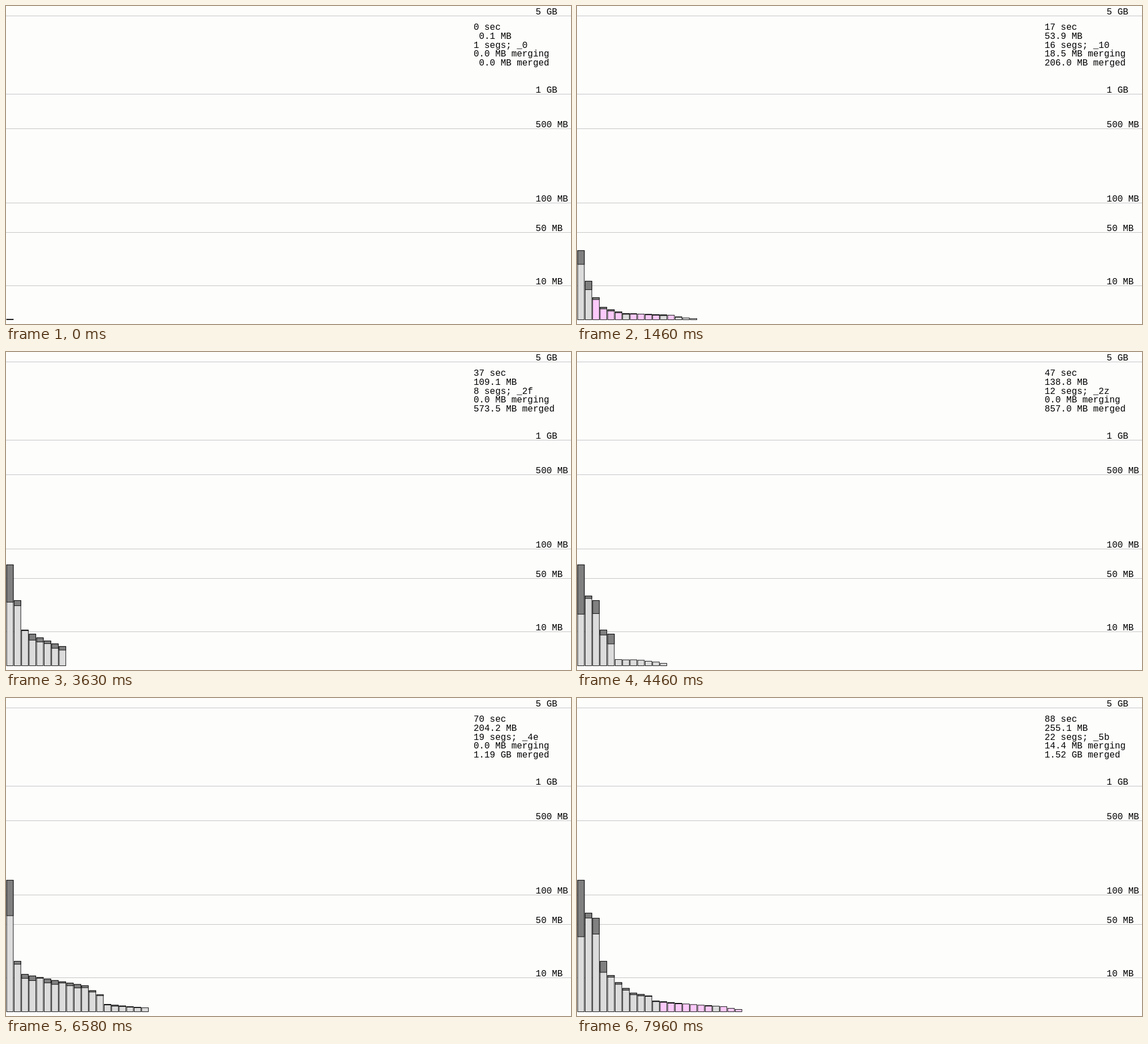
These frames come from a looping animation (998 by 561 pixels, 8 s). An HTML page with a canvas:

```html
<!DOCTYPE html>
<html lang="en">
<head>
<meta charset="utf-8">
<title>Segment merging</title>
<style>
  html, body { margin: 0; width: 100%; height: 100%; overflow: hidden; background: #fdfdfc; }
  canvas { display: block; }
</style>
</head>
<body>
<canvas id="stage" width="998" height="561"></canvas>
<script>
const ctx = document.getElementById('stage').getContext('2d');
const LOOP = 8000, STEPS_PER_CS = 0.24;
const SCALE = 998 / 1280, BASE = 553.4, UNIT = 85.8;
const LIVE = '#dcdcdc', DELETED = '#808080', MERGING = '#fccafa';
const GRID_MB = [10, 50, 100, 500, 1024, 5120];

// Key moments of the index. curve: [bar, height] points, eased between;
// worn: deleted share of the first bars, fade: of the rest; pink: range being merged, except spare;
// keep: [bar here, bar at the next moment]; rate: deleted share per step.
const STATES = [
  { n: 0, id: 0, sec: 0, mb: 0.1, merging: 0, merged: 0,
    curve: [[0, 1]], worn: [0], keep: [] },
  { n: 35, id: 36, sec: 17, mb: 53.9, merging: 18.5, merged: 206, rate: 0.0125,
    curve: [[0, 122], [1, 68], [2, 39], [3, 22], [6, 11], [12, 8], [15, 2]],
    worn: [0.2, 0.22], fade: 0.09, pink: [2, 12], spare: [6, 11], keep: [[0, 0]] },
  { n: 62, id: 62, sec: 24, mb: 72.4, merging: 94.7, merged: 485.4, rate: 0.01,
    curve: [[0, 122], [1, 91], [2, 94], [3, 83], [4, 26], [7, 8], [12, 4]],
    worn: [0.45, 0.07, 0.2, 0.25], fade: 0.05, pink: [0, 9], keep: [] },
  { n: 87, id: 87, sec: 37, mb: 109.1, merging: 0, merged: 573.5, rate: 0.015,
    curve: [[0, 178], [1, 115], [2, 63], [7, 34]],
    worn: [0.37, 0.08, 0.02, 0.19], fade: 0.13, keep: [] },
  { n: 126, id: 126, sec: 57, mb: 167.1, merging: 0, merged: 1126.4, rate: 0.006,
    curve: [[0, 232], [1, 54], [2, 52], [3, 31], [9, 13], [16, 4]],
    worn: [0.085, 0.05, 0.02], fade: 0.08, keep: [[0, 0]] },
  { n: 158, id: 158, sec: 70, mb: 204.2, merging: 0, merged: 1218.6, rate: 0.007,
    curve: [[0, 232], [1, 89], [2, 66], [10, 46], [12, 30], [13, 13], [18, 7]],
    worn: [0.27, 0.06, 0.11, 0.13, 0.02], fade: 0.1, keep: [[0, 0], [1, 3]] },
  { n: 191, id: 191, sec: 88, mb: 255.1, merging: 14.4, merged: 1556.5, rate: 0.005,
    curve: [[0, 232], [1, 174], [2, 165], [3, 89], [4, 64], [7, 33], [9, 28], [10, 19], [19, 9], [21, 4]],
    worn: [0.43, 0.05, 0.17, 0.22, 0.05], fade: 0.06, pink: [11, 21], spare: [18], keep: [] }
];

const lerp = (a, b, u) => a + (b - a) * u;
const toMB = h => 10 * (Math.exp(h / UNIT) - 1);
const toHeight = mb => UNIT * Math.log(1 + mb / 10);
const liveMB = s => toMB(s.h) * (1 - s.del / s.h);
const rand = n => { const v = Math.sin(n * 12.9898 + 4.1) * 43758.5453; return v - Math.floor(v); };

function curveAt(points, i) {
  const k = points.findIndex(p => p[0] >= i);
  const [x, h] = points[k];
  if (x === i) return h;
  const [x0, h0] = points[k - 1];
  return h0 * Math.pow(h / h0, (i - x0) / (x - x0));
}

function stateBars(s) {
  const count = s.curve[s.curve.length - 1][0] + 1;
  const [first, last] = s.pink || [0, -1];
  return Array.from({ length: count }, (_, i) => {
    const h = curveAt(s.curve, i);
    const share = s.worn[i] ?? s.fade * lerp(0.4, 1.6, rand(s.n + i));
    const pink = i >= first && i <= last && !(s.spare || []).includes(i);
    return { h, del: h * share, pink };
  });
}

function barsBetween(a, b, n) {
  const span = b.n - a.n, u = (n - a.n) / span;
  const merges = [0.35, 0.65, 1].map(f => a.n + Math.round(span * f));
  const from = stateBars(a), to = stateBars(b);
  const segs = [], births = new Set();

  from.forEach((s, i) => {
    const pair = a.keep.find(p => p[0] === i);
    if (pair) {
      segs.push({ h: s.h, del: lerp(s.del, to[pair[1]].del, u), birth: 0, death: Infinity });
      return;
    }
    const death = s.pink ? a.n + 4 : merges[i >= from.length / 2 ? 0 : 1];
    const del = Math.min(s.h * 0.7, s.del + s.h * b.rate * (n - a.n));
    segs.push({ h: s.h, del, birth: 0, death });
  });

  to.forEach((s, j) => {
    if (a.keep.some(p => p[1] === j)) return;
    const wanted = Math.max(s.del / s.h / b.rate, Math.min(to.length - 1 - j, 6));
    const age = Math.min(span - 4, Math.round(wanted));
    const birth = b.n - age;
    births.add(birth);
    segs.push({ h: s.h, del: age ? s.del * (n - birth) / age : 0, birth, death: Infinity });
  });

  // Fresh flushes live until the next merge.
  for (let f = a.n + 1; f < b.n; f++) {
    if (births.has(f)) continue;
    const h = 4 + 10 * rand(f);
    segs.push({ h, del: Math.min(2, h * b.rate * Math.max(0, n - f)), birth: f, death: merges.find(m => m > f) });
  }
  const mergedMB = segs.filter(s => s.death === merges[0]).reduce((sum, s) => sum + liveMB(s), 0);
  const h = toHeight(mergedMB);
  segs.push({ h, del: Math.max(0, h * b.rate * (n - merges[0])), birth: merges[0], death: merges[1] });

  return segs
    .filter(s => s.birth <= n && n < s.death)
    .map(s => ({ h: s.h, del: s.del, pink: s.death - n <= 4 }))
    .sort((p, q) => liveMB(q) - liveMB(p));
}

function snapshot(n) {
  const i = STATES.findLastIndex(s => s.n <= n);
  const a = STATES[i], b = STATES[i + 1];
  if (a.n === n) return { ...a, bars: stateBars(a) };
  const u = (n - a.n) / (b.n - a.n);
  const held = Math.floor((n - a.n) / 4) * 4 / (b.n - a.n);
  const bars = barsBetween(a, b, n);
  return {
    bars,
    id: Math.round(lerp(a.id, b.id, u)),
    sec: lerp(a.sec, b.sec, u),
    mb: lerp(a.mb, b.mb, u),
    merging: bars.reduce((sum, s) => sum + (s.pink ? toMB(s.h) : 0), 0),
    merged: lerp(a.merged, b.merged, held)
  };
}

function formatSize(mb, width) {
  return mb >= 1024 ? (mb / 1024).toFixed(2) + ' GB' : mb.toFixed(1).padStart(width) + ' MB';
}

function box(x, y, h, fill) {
  ctx.fillStyle = fill;
  ctx.fillRect(x, y, 15 * SCALE, h);
  ctx.strokeRect(x, y, 15 * SCALE, h);
}

function drawBar(s, i) {
  const x = (1.5 + 17 * i) * SCALE, top = BASE - s.h;
  box(x, top, s.h, s.pink ? MERGING : LIVE);
  if (s.del > 0.6) box(x, top, s.del, DELETED);
}

function drawGrid() {
  for (const mb of GRID_MB) {
    const y = Math.floor(BASE - toHeight(mb));
    ctx.fillStyle = '#c6c6c6';
    ctx.fillRect(0, y, 998, 1);
    ctx.fillStyle = '#000';
    ctx.fillText(mb < 1024 ? mb + ' MB' : mb / 1024 + ' GB', 935.6, y - 1.7);
  }
}

function draw(n) {
  const s = snapshot(n);
  ctx.fillStyle = '#fdfdfc';
  ctx.fillRect(0, 0, 998, 561);
  ctx.font = '15.9px "Liberation Mono", monospace';
  drawGrid();

  ctx.strokeStyle = '#000';
  ctx.lineWidth = 0.9;
  s.bars.forEach(drawBar);

  ctx.fillStyle = '#000';
  [
    Math.floor(s.sec) + ' sec',
    formatSize(s.mb, 4),
    s.bars.length + ' segs; _' + s.id.toString(36),
    formatSize(s.merging, 0) + ' merging',
    formatSize(s.merged, 4) + ' merged'
  ].forEach((line, i) => ctx.fillText(line, 826, 42.4 + i * 15.6));
}

function tick() {
  const cs = Math.floor(performance.now() % LOOP / 10);
  draw(Math.floor((cs + 0.49) * STEPS_PER_CS));
  requestAnimationFrame(tick);
}
tick();
</script>
</body>
</html>
```
